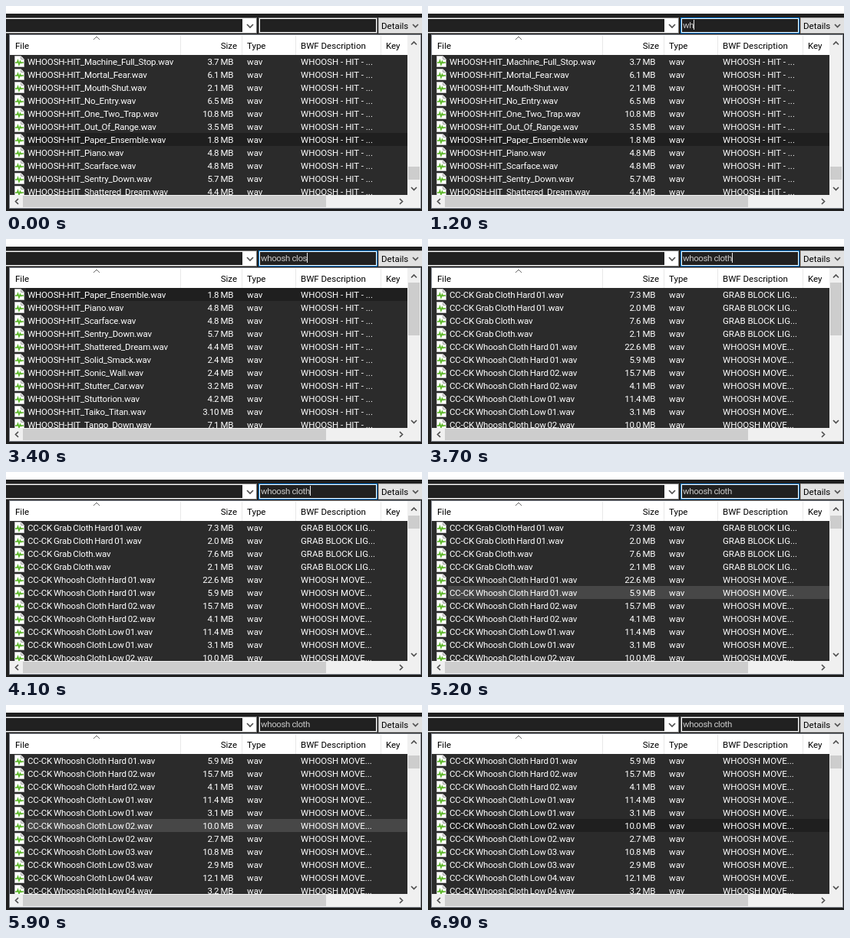
An HTML page for the animation above (7000 ms loop, 542x268 px).

```html
<!DOCTYPE html>
<html lang="en">
<head>
<meta charset="utf-8">
<title>File search</title>
<style>
html, body { margin: 0; width: 100%; height: 100%; overflow: hidden; background: #1f1f1f; }
svg { display: block; width: 542px; height: 268px; }
text { font: 11.5px Roboto, "Liberation Sans", sans-serif; white-space: pre; }
.row text { fill: #fff; }
.row .name { letter-spacing: -.15px; word-spacing: -.9px; }
.row .size, #query { letter-spacing: -.4px; }
.size { text-anchor: end; }
.arrow { fill: none; stroke: #505050; stroke-width: 1.7; }
</style>
</head>
<body>
<svg viewBox="0 0 542 268">
  <defs>
    <clipPath id="view"><rect x="5" y="64" width="518" height="183"/></clipPath>
    <g id="icon">
      <path d="M11.5 1.5h8l4 4v10h-12z" fill="#fff" stroke="#b9b9b9"/>
      <path d="M19.5 1.5v4h4" fill="#e4e4e4" stroke="#a5a5a5"/>
      <path d="M12 10h2.500l1-2.500 1.500 5 1.500-4 1 2 1-.5h2.500" fill="none" stroke="#56b420" stroke-width="1.600"/>
    </g>
  </defs>
  <rect width="542" height="268" fill="#1f1f1f"/>
  <rect width="542" height="10" fill="#fff"/>

  <!-- toolbar -->
  <rect x="-2" y="15.500" width="328.500" height="20" fill="#fff" stroke="#7a7a7a"/>
  <rect y="17" width="308" height="17" fill="#212121"/>
  <path class="arrow" d="M314 24l4 4 4-4"/>
  <rect id="box" x="329.500" y="15.500" width="154" height="20" fill="#fff"/>
  <rect x="331" y="17" width="151" height="17" fill="#212121"/>
  <text id="query" x="332" y="29" fill="#c8c8c8"></text>
  <rect id="caret" y="18" width="1" height="13" fill="#e8e8e8"/>
  <rect x="485.500" y="15.500" width="58" height="20" fill="#e1e1e1" stroke="#adadad"/>
  <text x="489" y="30">Details</text>
  <path class="arrow" d="M530 24l3.500 3.500 3.500-3.500"/>

  <!-- list -->
  <rect x="4.500" y="37.500" width="536" height="227" fill="#2b2b2b" stroke="#828790"/>
  <rect x="5" y="38" width="535" height="26" fill="#fff"/>
  <path d="M227.500 39v25M307.500 39v25M377.500 39v25M488.500 39v25" stroke="#e8e8e8"/>
  <path class="arrow" d="M114 44l4-4 4 4" style="stroke-width:1;stroke:#666"/>
  <text x="12" y="56">File</text>
  <text x="301" y="56" class="size">Size</text>
  <text x="314" y="56">Type</text>
  <text x="384" y="56">BWF Description</text>
  <text x="495" y="56">Key</text>
  <g clip-path="url(#view)">
    <rect id="mark" x="26" width="497" height="17"/>
    <g id="rows"></g>
  </g>

  <!-- scrollbars -->
  <rect x="523" y="38" width="17" height="226" fill="#f0f0f0"/>
  <rect x="5" y="247" width="535" height="17" fill="#f0f0f0"/>
  <rect id="thumb" x="524" width="15" fill="#cdcdcd"/>
  <rect x="22" y="248" width="395" height="15" fill="#cdcdcd"/>
  <path id="up" class="arrow" d="M528 50.500l3.500-3.500 3.500 3.500"/>
  <path class="arrow" d="M528 237l3.500 3.500 3.500-3.500M16 252l-3.500 3.500 3.500 3.500M513 252l3.500 3.500-3.500 3.500"/>
</svg>
<script>
const LOOP = 7000, STEP = 100, TOP = 64, PITCH = 17, VISIBLE = 11;
const $ = id => document.getElementById(id);
const clamp = v => Math.min(1, Math.max(0, v));

const parse = (text, prefix, note) => text.split(", ").map((item, i) => {
  const cut = item.lastIndexOf(" ");
  return [prefix + item.slice(0, cut) + ".wav", item.slice(cut + 1) + " MB", "wav", note(i)];
});

const hits = parse("Machine_Full_Stop 3.7, Mortal_Fear 6.1, Mouth-Shut 2.1, No_Entry 6.5, " +
  "One_Two_Trap 10.8, Out_Of_Range 3.5, Paper_Ensemble 1.8, Piano 4.8, Scarface 4.8, " +
  "Sentry_Down 5.7, Shattered_Dream 4.4, Solid_Smack 2.4, Sonic_Wall 2.4, Stutter_Car 3.2, " +
  "Stuttorion 4.2, Taiko_Titan 3.10, Tango_Down 7.1",
  "WHOOSH-HIT_", () => "WHOOSH - HIT - ...");

const cloths = parse("Grab Cloth Hard 01 7.3, Grab Cloth Hard 01 2.0, Grab Cloth 7.6, Grab Cloth 2.1, " +
  "Whoosh Cloth Hard 01 22.6, Whoosh Cloth Hard 01 5.9, Whoosh Cloth Hard 02 15.7, " +
  "Whoosh Cloth Hard 02 4.1, Whoosh Cloth Low 01 11.4, Whoosh Cloth Low 01 3.1, " +
  "Whoosh Cloth Low 02 10.0, Whoosh Cloth Low 02 2.7, Whoosh Cloth Low 03 10.8, " +
  "Whoosh Cloth Low 03 2.9, Whoosh Cloth Low 04 12.1, Whoosh Cloth Low 04 3.2",
  "CC-CK ", i => i < 4 ? "GRAB BLOCK LIG..." : "WHOOSH MOVE...");

// [time, text in the search box]
const typing = [[0, ""], [1100, "w"], [1200, "wh"], [1300, "who"], [1400, "whoo"],
  [1600, "whoosh"], [1800, "whoosh "], [2500, "whoosh c"], [2600, "whoosh cl"],
  [2800, "whoosh clo"], [3000, "whoosh clos"], [3500, "whoosh clo"],
  [3600, "whoosh clot"], [3700, "whoosh cloth"]];

// [time, top, height]
const thumbs = [[0, 210, 17], [2200, 193, 17], [3400, 57, 69], [4100, 57, 17]];

const at = (keys, t) => keys.filter(k => k[0] <= t).pop();
const set = (el, attrs) => { for (const k in attrs) el.setAttribute(k, attrs[k]); };
const mix = (a, b, k) => `rgb(${a.map((v, i) => Math.round(v + (b[i] - v) * k))})`;

$("rows").innerHTML = Array.from({ length: VISIBLE }, (_, i) =>
  `<g class="row" transform="translate(0 ${TOP + PITCH * i})"><use href="#icon"/>
   <text class="name" x="28" y="13"/><text class="size" x="296" y="13"/>
   <text x="314" y="13"/><text x="384" y="13"/></g>`).join("");
const cells = [...document.querySelectorAll(".row")].map(r => [...r.querySelectorAll("text")]);

function drawList(t) {
  const cloth = t >= 3500;
  const list = cloth ? cloths : hits;
  const scroll = cloth ? 5 * clamp((t - 5200) / 500) : t < 2200 ? 0 : 6;
  cells.forEach((row, i) => row.forEach((cell, c) => { cell.textContent = list[scroll + i][c]; }));

  const hover = cloth && t < 6900;
  const marked = !cloth ? 6 : t < 5900 ? 5 : 10;
  set($("mark"), {
    y: TOP + PITCH * (marked - scroll),
    fill: hover ? "#474747" : "#1f1f1f",
    visibility: cloth && t < 5200 ? "hidden" : "visible"
  });
  const [, y, height] = at(thumbs, t);
  set($("thumb"), { y: cloth ? Math.round(y + 1.7 * scroll) : y, height });
  $("up").style.stroke = t >= 6600 && t < 6900 ? "#000" : "";
}

function drawSearch(t) {
  const focus = Math.min(clamp(t / 500), 1 - clamp((t - 5100) / 600));
  set($("box"), { stroke: mix([122, 122, 122], [0, 120, 215], focus) });
  $("query").textContent = at(typing, t)[1];
  set($("caret"), {
    x: Math.round(332 + $("query").getComputedTextLength()),
    visibility: t >= 1000 && t < 4700 ? "visible" : "hidden"
  });
}

function draw(ms) {
  const t = Math.floor(ms % LOOP / STEP) * STEP;
  drawList(t);
  drawSearch(t);
}

const start = performance.now();
function tick() {
  draw(performance.now() - start);
  requestAnimationFrame(tick);
}
tick();
</script>
</body>
</html>
```
